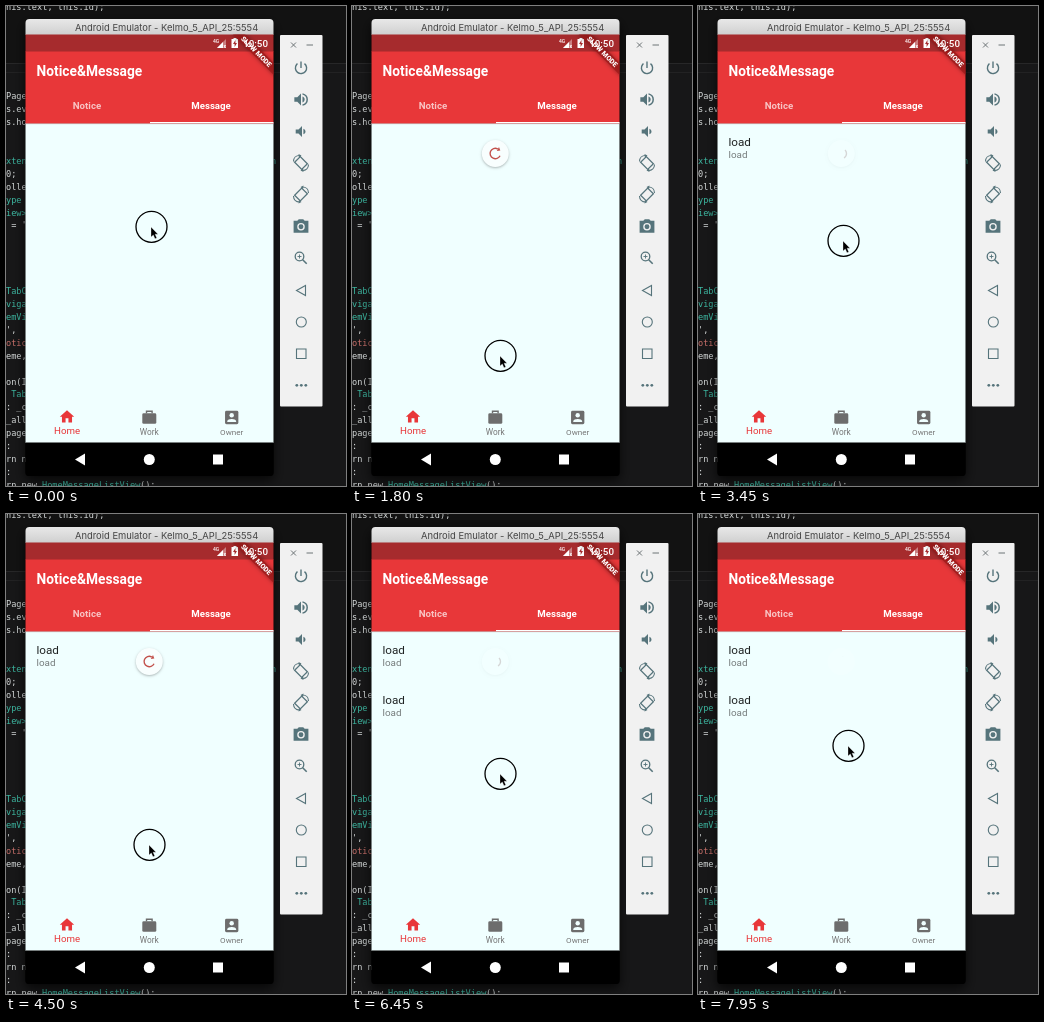
Animation of 340x480 px, one loop 8000 ms. Source, as an HTML page with a canvas:

```html
<!DOCTYPE html>
<html lang="en">
<head>
<meta charset="utf-8">
<title>Pull to refresh</title>
<style>
html, body { margin: 0; width: 100%; height: 100%; overflow: hidden; background: #171718; }
canvas { display: block; width: 340px; height: 480px; }
</style>
</head>
<body>
<canvas id="stage"></canvas>
<script>
const W = 340, H = 480, LOOP = 8000, STEP = 150;
const canvas = document.getElementById('stage');
const ctx = canvas.getContext('2d');
const dpr = window.devicePixelRatio || 1;
canvas.width = W * dpr;
canvas.height = H * dpr;

const SANS = 'Roboto, "Open Sans", sans-serif';
const MONO = '"DejaVu Sans Mono", "Noto Sans Mono", monospace';
const RED = '#e83739', SLATE = '#56747b', TEAL = '#3db8a2', PALE = '#d6dada';
const LEFT = 19.5, WIDE = 248;

// time, pointer x, pointer y, pull amount
const KEYS = [
  [0, 145, 221, 0], [300, 145, 238, .35], [750, 146, 290, 1],
  [1500, 148, 344, 1], [1800, 148, 350, 1], [2100, 148, 350, 1],
  [3000, 145, 228, 0], [3300, 145, 226, 0], [3450, 145, 235, .35],
  [3900, 144, 282, 1], [4500, 143, 331, 1], [4800, 143, 334, 1],
  [5400, 155, 250, 0], [6300, 148, 249, 0], [6450, 148, 260, .35],
  [6750, 148, 300, 1], [7050, 149, 328, 1], [7350, 149, 318, 1],
  [7800, 150, 248, .3], [7950, 150, 232, .03]
];
// pointer released, refresh finished, spinner gone
const REFRESHES = [[2100, 2700, 3000], [4800, 5100, 5400]];
const PRESSES = [[0, 2100], [3300, 4800], [6300, LOOP]];

const CODE = [
  [90, 'Page'], [103, 's.ev'], [116, 's.ho'], [155, 'xten', TEAL], [168, '0;'],
  [181, 'olle'], [194, 'ype', TEAL], [207, 'iew>', TEAL], [219, " = '"],
  [285, 'TabC', TEAL], [298, 'viga', TEAL], [311, 'emVi', TEAL], [324, "',"],
  [337, 'otic', '#c9706a'], [350, 'eme,'], [376, 'on(I'], [388, ' Tab', TEAL],
  [401, ': _c'], [414, '_all'], [427, 'page'], [440, ':'], [453, 'rn n'], [466, ':']
];

const pressed = t => PRESSES.some(([from, to]) => t >= from && t < to);

function rect(x, y, w, h, fill, radii = 0) {
  ctx.beginPath();
  ctx.roundRect(x, y, w, h, radii);
  ctx.fillStyle = fill;
  ctx.fill();
}

function text(str, x, y, font, fill, align = 'left') {
  ctx.font = font;
  ctx.fillStyle = fill;
  ctx.textAlign = align;
  ctx.fillText(str, x, y);
}

function circle(x, y, r, fill, stroke, width = 1) {
  ctx.beginPath();
  ctx.arc(x, y, r, 0, Math.PI * 2);
  if (fill) { ctx.fillStyle = fill; ctx.fill(); }
  if (stroke) { ctx.strokeStyle = stroke; ctx.lineWidth = width; ctx.stroke(); }
}

// Runs draw with the origin at x, y
function at(x, y, draw, scale = 1, angle = 0) {
  ctx.save();
  ctx.translate(x, y);
  ctx.rotate(angle);
  ctx.scale(scale, scale);
  draw();
  ctx.restore();
}

function shape(d, fill, stroke, width = 1) {
  const path = new Path2D(d);
  if (fill) { ctx.fillStyle = fill; ctx.fill(path, 'evenodd'); }
  if (stroke) { ctx.strokeStyle = stroke; ctx.lineWidth = width; ctx.stroke(path); }
}

function drawEditor() {
  rect(0, 0, W, H, '#171718');
  rect(0, 0, W, 57, '#121212');
  rect(0, 57, W, 1, '#272728');
  rect(0, 66, W, 1, '#222223');
  const font = '8.6px ' + MONO;
  text('his.text, this.id);', 0, 3.5, font, PALE);
  for (const [y, str, color] of CODE) text(str, 0, y + 2.6, font, color || PALE);
  text('n', 265, 157.6, font, TEAL);
  text('rn', 0, 481.6, font, PALE);
  text('new', 15.5, 481.6, font, PALE);
  text('HomeMessageListView', 36, 481.6, font, TEAL);
  text('();', 134, 481.6, font, PALE);
}

function drawStatus() {
  rect(LEFT, 28.5, WIDE, 17.5, '#a62b2d');
  text('4G', 207, 37, '500 5px ' + SANS, '#fff');
  shape('M220 33V42H211Z', 'rgba(255,255,255,.4)');
  shape('M217 36V42H211Z', '#fff');
  text('x', 217.5, 42, '700 5px ' + SANS, '#fff');
  shape('M225.5 33H227.5V32H230.5V33H232V42H225.5ZM229.5 34L227 38H228.6V41L231 37H229.4Z', '#fff');
}

function drawBanner() {
  ctx.save();
  ctx.beginPath();
  ctx.rect(LEFT, 28.5, WIDE, 90);
  ctx.clip();
  at(267, 29, () => {
    ctx.shadowColor = 'rgba(0,0,0,.5)';
    ctx.shadowBlur = 4 * dpr;
    rect(-30, 19.2, 60, 8.6, 'rgba(160,24,24,.75)');
    ctx.shadowColor = 'transparent';
    text('SLOW MODE', 0, 26, '900 7px ' + SANS, '#fff', 'center');
  }, 1, Math.PI / 4);
  ctx.restore();
}

function drawNav() {
  at(61, 410.8, () => shape('M-2 8V2H2V8H7V0H10L0 -9L-10 0H-7V8Z', RED), .72);
  at(143.3, 411.5, () => {
    rect(-10, -6, 20, 15, '#6d6d6d', 2);
    shape('M-4 -6V-9H4V-6', null, '#6d6d6d', 2);
  }, .7);
  at(225.7, 411.5, () => {
    rect(-9, -9, 18, 18, '#6d6d6d', 2);
    circle(0, -3, 3, '#f0ffff');
    shape('M-6 6V5C-6 3 -2 2 0 2S6 3 6 5V6Z', '#f0ffff');
  }, .74);
  text('Home', 61, 428, '9.7px ' + SANS, RED, 'center');
  text('Work', 143.3, 429.3, '8.3px ' + SANS, '#757575', 'center');
  text('Owner', 225.7, 429.3, '8.1px ' + SANS, '#757575', 'center');
  rect(LEFT, 436.5, WIDE, 33.5, '#000', [0, 0, 3, 3]);
  shape('M69 453.5L79 447.5V459.5Z', '#fff');
  circle(143.3, 453.5, 5.5, '#fff');
  rect(207, 448.5, 10, 10, '#fff');
}

function drawPhone(t) {
  ctx.save();
  ctx.shadowColor = 'rgba(0,0,0,.75)';
  ctx.shadowBlur = 12 * dpr;
  ctx.shadowOffsetY = 4 * dpr;
  rect(LEFT, 14, WIDE, 456, '#000', 4);
  ctx.restore();

  const bar = ctx.createLinearGradient(0, 13, 0, 29);
  bar.addColorStop(0, '#e8e8e8');
  bar.addColorStop(1, '#cfcfcf');
  rect(LEFT, 13, WIDE, 16, bar, [4, 4, 0, 0]);
  text('Android Emulator - Kelmo_5_API_25:5554', 69, 24.5, '9.4px Inter, sans-serif', '#454545');

  rect(LEFT, 117, WIDE, 320, '#f0ffff');
  drawStatus();
  rect(LEFT, 45.5, WIDE, 72, RED);
  text('Notice&Message', 30.5, 69.7, '700 13.75px ' + SANS, '#fff');
  text('Notice', 81, 103.3, '700 9.7px ' + SANS, 'rgba(255,255,255,.7)', 'center');
  text('Message', 205, 103.3, '700 9.7px ' + SANS, '#fff', 'center');
  rect(144, 116, 123.5, 1.3, '#fff');
  rect(LEFT, 117.3, WIDE, 1, 'rgba(0,0,0,.15)');
  drawBanner();
  text('10:50', 262, 41.3, '500 9.8px ' + SANS, '#fff', 'right');

  REFRESHES.forEach(([, done], i) => {
    if (t < done) return;
    text('load', 30.5, 139.8 + i * 50, '11.7px ' + SANS, '#202424');
    text('load', 30.5, 151.8 + i * 50, '9.9px ' + SANS, '#757c7c');
  });
  drawNav();
}

function drawRotate(y, flip) {
  at(295, y, () => {
    ctx.scale(flip, 1);
    at(0, 0, () => {
      ctx.strokeStyle = SLATE;
      ctx.lineWidth = 1.3;
      ctx.strokeRect(-5, -4, 10, 8);
    }, 1, Math.PI / 4);
    shape('M-7.5 -1.5C-7.5 -5 -5 -7.5 -1.5 -7.5M7.5 1.5C7.5 5 5 7.5 1.5 7.5', null, SLATE, 1.1);
    shape('M-2.5 -9L0.5 -7.5L-2 -5.5ZM2.5 9L-0.5 7.5L2 5.5Z', SLATE);
  });
}

function drawTools() {
  rect(274, 29, 42.5, 371.5, '#f1f1f1', 1);
  shape('M285 36.5L290 41.5M290 36.5L285 41.5M300.5 39H307', null, '#6d7476', 1);

  ctx.strokeStyle = SLATE;
  ctx.lineWidth = 1.4;
  ctx.beginPath();
  ctx.arc(295, 62, 5.6, -.9, Math.PI + .9);
  ctx.stroke();
  shape('M295 55.5V62', null, SLATE, 1.4);

  const speaker = 'M-9 -3V3H-5L0 8V-8L-5 -3ZM2 -4C6 -2.5 6 2.5 2 4Z';
  at(295, 93.5, () => {
    shape(speaker, SLATE);
    shape('M2 -7.6C10.5 -5.5 10.5 5.5 2 7.6', null, SLATE, 2);
  }, .74);
  at(296, 125.5, () => shape(speaker, SLATE), .7);
  drawRotate(157, 1);
  drawRotate(188.5, -1);

  at(295, 220, () => {
    shape('M-3 -9L-5 -7H-10V9H10V-7H5L3 -9Z', SLATE);
    circle(0, 1, 4.2, SLATE, '#f1f1f1', 1.8);
  }, .74);
  circle(293.5, 250.5, 4.3, null, SLATE, 1.3);
  shape('M296.7 253.7L300.7 257.7', null, SLATE, 1.6);
  shape('M291.5 250.5H295.5M293.5 248.5V252.5', null, SLATE, .9);
  shape('M290.5 284.5L299.5 279.5V289.5Z', null, SLATE, 1.1);
  circle(295.3, 316, 5, null, SLATE, 1.1);
  shape('M290.5 343H300V352.5H290.5Z', null, SLATE, 1.1);
  for (const dx of [-4.5, 0, 4.5]) circle(295.3 + dx, 379.3, 1.4, SLATE);
}

function drawSpinner(t, pull) {
  const job = REFRESHES.find(([from, , to]) => t >= from && t < to);
  if (!job && !pressed(t)) return;
  const amount = job ? 1 : pull;
  if (amount <= 0) return;
  const spin = job ? (t - job[0]) / 1000 * Math.PI * 2 : 0;
  const scale = job ? Math.min(1, (job[2] - t) / (job[2] - job[1])) : 1;
  at(143.3, 147.5, () => {
    ctx.save();
    ctx.shadowColor = `rgba(0,0,0,${.28 * amount * amount})`;
    ctx.shadowBlur = 2.5 * dpr;
    ctx.shadowOffsetY = dpr;
    circle(0, 0, 13.5, amount < 1 ? '#f2ffff' : '#f8fefe');
    ctx.restore();
    const start = (-80 + 105 * amount) * Math.PI / 180;
    const end = start + Math.min(275, 290 * amount) * Math.PI / 180;
    ctx.globalAlpha = amount;
    ctx.rotate(spin);
    ctx.strokeStyle = amount < 1 ? '#a08a8a' : '#c2504b';
    ctx.lineWidth = 1.4;
    ctx.beginPath();
    ctx.arc(0, 0, 5.2, start, end);
    ctx.stroke();
    if (amount > .8 && !job) {
      at(Math.cos(end) * 5.2, Math.sin(end) * 5.2,
        () => shape('M-2.2 0H2.2L0 2.8Z', '#c2504b'), 1, end);
    }
  }, scale);
}

function drawPointer(t, x, y) {
  if (pressed(t)) circle(x + .5, y - .2, 15.5, null, '#000', 1.3);
  at(x, y, () => shape('M0 0V10L2.3 7.9L4 11.8L5.8 11L4.1 7.2H7Z', '#000', 'rgba(255,255,255,.6)', .5));
}

function sample(t) {
  let i = 0;
  while (i < KEYS.length - 2 && t >= KEYS[i + 1][0]) i++;
  const a = KEYS[i], b = KEYS[i + 1];
  const k = Math.min(1, (t - a[0]) / (b[0] - a[0]));
  return a.slice(1).map((v, n) => v + (b[n + 1] - v) * k);
}

function frame(now) {
  const t = Math.floor(now % LOOP / STEP) * STEP;
  const [x, y, pull] = sample(t);
  ctx.setTransform(dpr, 0, 0, dpr, 0, 0);
  drawEditor();
  drawPhone(t);
  drawTools();
  drawSpinner(t, pull);
  drawPointer(t, x, y);
}

let origin = null;
function tick(now) {
  if (origin === null) origin = now;
  frame(now - origin);
  requestAnimationFrame(tick);
}
frame(0);
requestAnimationFrame(tick);
</script>
</body>
</html>
```
